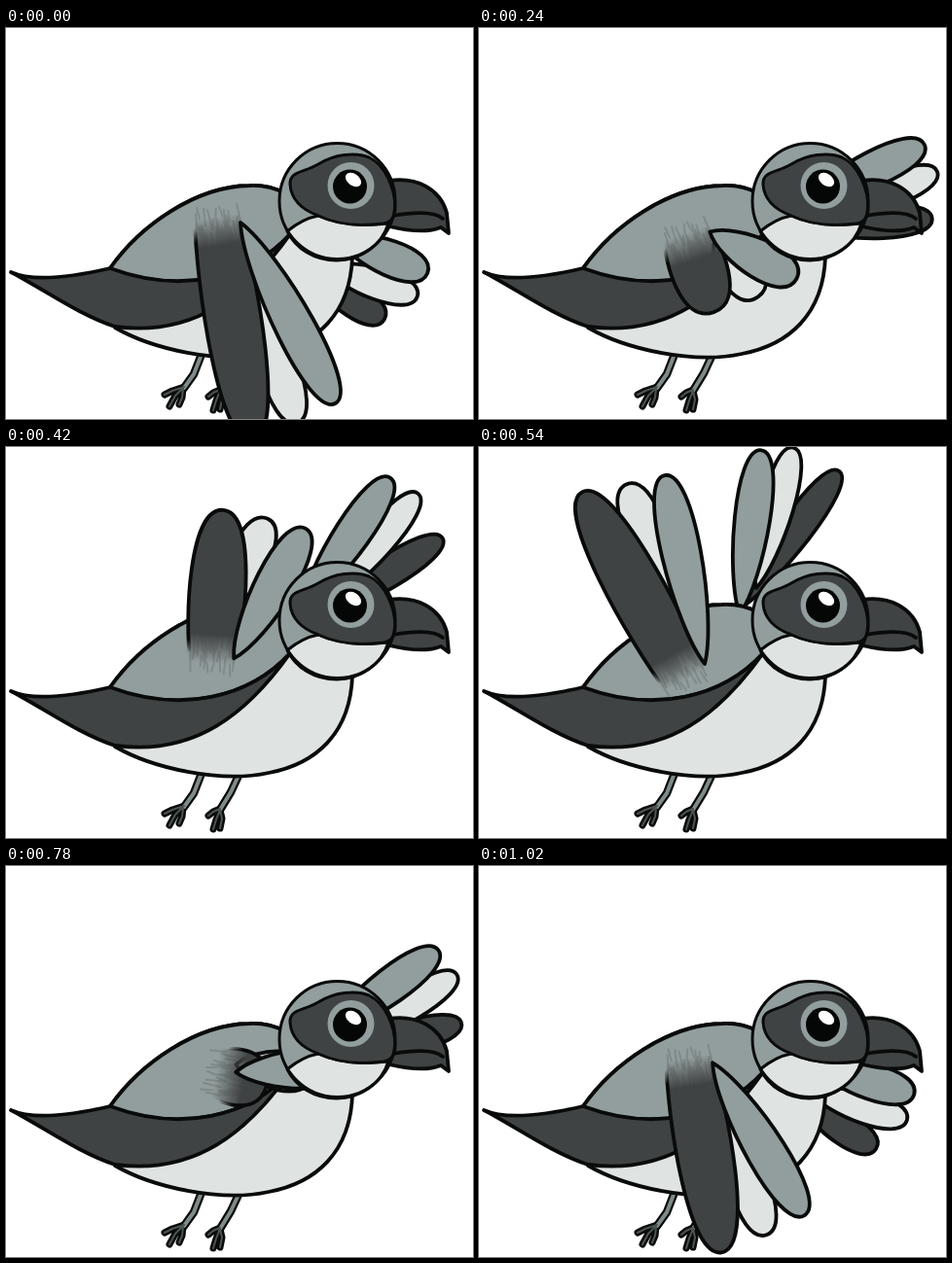
Animation of 480x402 px, one loop 1.08 s. Source, as an HTML page:

```html
<!DOCTYPE html>
<html lang="en">
<head>
<meta charset="utf-8">
<title>Flapping bird</title>
<style>
html, body { margin: 0; width: 100%; height: 100%; overflow: hidden; background: #fff; }
svg { display: block; width: 100%; height: 100%; }
.ink { stroke: #090b0a; stroke-width: 3.8; stroke-linejoin: round; stroke-linecap: round; }
.thin { stroke-width: 3; }
.grey { fill: #929d9d; }
.white { fill: #dfe4e2; }
.dark { fill: #404343; }
.line { fill: none; }
.fade { fill: url(#fadeFill); stroke: url(#fadeInk); stroke-width: 3.8; }
.fur { fill: none; stroke: #404343; stroke-opacity: .22; stroke-width: 2; stroke-linecap: round; }
.limb { fill: none; stroke-linecap: round; stroke-linejoin: round; }
</style>
</head>
<body>
<svg viewBox="0 0 480 402">
  <defs>
    <linearGradient id="fadeFill" gradientUnits="userSpaceOnUse">
      <stop offset=".1" stop-color="#404343" stop-opacity="0"/>
      <stop offset=".8" stop-color="#404343"/>
    </linearGradient>
    <linearGradient id="fadeInk" gradientUnits="userSpaceOnUse">
      <stop offset=".3" stop-color="#090b0a" stop-opacity="0"/>
      <stop offset=".65" stop-color="#090b0a"/>
    </linearGradient>
    <path id="legs" d="M200 338L193 356L183 370M238 340L231 355L220 373"/>
    <path id="toes" d="M183 369L171 373L163 377M182 370L174 378L168 389M182 371L181 380L178 387M220 372L213 375L208 379M220 373L216 383L213 393M220 373L222 382L220 392"/>
  </defs>

  <g id="far"></g>

  <g class="limb">
    <use href="#legs" stroke="#090b0a" stroke-width="8.5"/>
    <use href="#toes" stroke="#090b0a" stroke-width="7"/>
    <use href="#legs" stroke="#7f8a8a" stroke-width="4"/>
    <use href="#toes" stroke="#4c5353" stroke-width="2"/>
  </g>

  <g class="ink">
    <path class="white" d="M107 247C138 203 195 163 250 162Q270 161 287 170L356 235C354 295 318 326 270 335C220 346 150 330 112 308Z"/>
    <path class="grey" d="M107 247C138 203 195 163 250 162Q270 161 287 170L292 212C250 258 180 274 107 248Z"/>
    <path class="dark" d="M5 251C25 260 60 258 107 247C180 274 250 258 292 212C248 274 194 318 112 307C75 295 38 268 5 251Z"/>
  </g>

  <g id="near"></g>

  <g class="ink">
    <path class="dark" d="M394 157C422 153 446 165 453 190L455 211L447 205C435 210 415 209 394 204Z"/>
    <path class="line" d="M398 193C415 190 438 187 449 196"/>
  </g>
  <circle class="grey" cx="340.5" cy="178" r="59.5"/>
  <g class="ink thin">
    <path class="white" d="M289 209Q305 196 321 193C343 203 368 204 393 201C386 224 364 239 340 239C317 239 298 227 289 209Z"/>
    <path class="dark" d="M292 161C291 147 306 149 321 140C337 130 359 127 373 133C390 141 400 165 400 185Q400 199 388 201C365 204 342 203 321 193C302 186 293 174 292 161Z"/>
    <circle class="line" cx="340.5" cy="178" r="59.5"/>
  </g>
  <circle class="grey" cx="354.5" cy="162" r="24"/>
  <circle cx="353.5" cy="163" r="17.5" fill="#050606"/>
  <ellipse cx="357" cy="156" rx="9" ry="6" fill="#fff" transform="rotate(35 357 156)"/>
</svg>
<script>
const STEP = 60, HALF = 9;

// Key poses of the upstroke; the downstroke mirrors it.
const POSES = [
  { k: 0, far: 25, near: 61, reach: 207, tilt: 1 },
  { k: 1, far: 17, near: 58, reach: 182, tilt: 1 },
  { k: 3, far: -4, near: 42, reach: 122, tilt: 1 },
  { k: 4, far: -24, near: 31, reach: 103, tilt: 0.9 },
  { k: 7, far: -59, near: -60, reach: 140, tilt: -0.5 },
  { k: 9, far: -93, near: -105, reach: 182, tilt: 0.45 }
];

// Each base slides along a quadratic curve; fan sets a feather off from the leading one.
const FAR = [
  { kind: "dark", base: [[315, 255], [390, 190], [265, 168]], w: 17, fan: 26, size: 0.96 },
  { kind: "white", base: [[325, 245], [400, 185], [285, 145]], w: 17, fan: 10, size: 1.02 },
  { kind: "grey", base: [[340, 215], [355, 160], [268, 172]], w: 19, fan: 0, size: 1 }
];
const NEAR = [
  { kind: "white", base: [[252, 262], [255, 215], [197, 150]], w: 21, fan: [-39, 20] },
  { kind: "fade", base: [[216, 190], [208, 202], [214, 243]], w: 28, fan: [-85, 38] },
  { kind: "grey", base: [[241, 200], [237, 210], [232, 223]], w: 21, fan: [0, 0] }
];

const $ = id => document.getElementById(id);
const set = (el, attrs) => {
  for (const name in attrs) el.setAttribute(name, attrs[name]);
};
const add = (parent, attrs) => {
  const el = document.createElementNS("http://www.w3.org/2000/svg", "path");
  set(el, attrs);
  return parent.appendChild(el);
};
const polar = (x, y, r, deg) => {
  const a = deg * Math.PI / 180;
  return [x + r * Math.cos(a), y + r * Math.sin(a)];
};
const curve = ([a, b, c], t) => [0, 1].map(i =>
  a[i] * (1 - t) ** 2 + 2 * b[i] * t * (1 - t) + c[i] * t * t);

function poseAt(k) {
  const i = Math.max(1, POSES.findIndex(p => p.k >= k));
  const a = POSES[i - 1], b = POSES[i], f = (k - a.k) / (b.k - a.k);
  const pose = {};
  for (const name in a) pose[name] = a[name] + (b[name] - a[name]) * f;
  return pose;
}

function farTip({ fan, size }, pose, t) {
  const reach = 147 + 40 * Math.sin(t * Math.PI / 2);
  return polar(300, 190, reach * size, pose.far + fan);
}

function nearTip({ fan: [dx, dy] }, pose) {
  const [x, y] = polar(238, 205, pose.reach, pose.near);
  return [x + dx, y + dy * pose.tilt];
}

const build = (id, feathers, tip) => feathers.map(f => ({
  ...f, tip,
  el: add($(id), { class: f.kind === "fade" ? "fade" : "ink " + f.kind }),
  fur: f.kind === "fade" && add($(id), { class: "fur", d: furPath(f.w) })
}));

function furPath(w) {
  let seed = 7, d = "";
  const rand = () => (seed = seed * 16807 % 2147483647) / 2147483647;
  for (let i = 0; i < 45; i++) {
    const x = rand() * 30 - 8, v = (rand() * 2 - 1) * w * 0.8;
    d += `M${x.toFixed(1)} ${v.toFixed(1)}l${(8 + rand() * 14).toFixed(1)} ${(rand() * 4 - 2).toFixed(1)}`;
  }
  return d;
}

const wings = [...build("far", FAR, farTip), ...build("near", NEAR, nearTip)];

function drawFeather(f, pose, t) {
  const [x, y] = curve(f.base, t);
  const [tx, ty] = f.tip(f, pose, t);
  const dx = tx - x, dy = ty - y, len = Math.hypot(dx, dy);
  const c = dx / len, s = dy / len;
  const at = (u, v) =>
    `${(x + dx * u - s * f.w * v).toFixed(1)} ${(y + dy * u + c * f.w * v).toFixed(1)} `;
  // Root half width, then position and bulge of the side handles.
  const [b, u, h1, h2] = f.fur ? [0.8, 0.3, 1.15, 1.25] : [0, 0.22, 1.05, 1.5];
  set(f.el, {
    d: `M${at(0, b)}C${at(u, h1)}${at(1, h2)}${at(1, 0)}C${at(1, -h2)}${at(u, -h1)}${at(0, -b)}`
      + (f.fur ? "" : "Z")
  });
  if (!f.fur) return;
  const ends = { x1: x, y1: y, x2: x + c * 42, y2: y + s * 42 };
  set($("fadeFill"), ends);
  set($("fadeInk"), ends);
  set(f.fur, { transform: `matrix(${c} ${s} ${-s} ${c} ${x} ${y})` });
}

let shown = -1;
function tick() {
  const step = Math.floor(performance.now() / STEP) % (2 * HALF);
  if (step !== shown) {
    shown = step;
    const k = Math.min(step, 2 * HALF - step), pose = poseAt(k);
    wings.forEach(f => drawFeather(f, pose, k / HALF));
  }
  requestAnimationFrame(tick);
}
tick();
</script>
</body>
</html>
```
